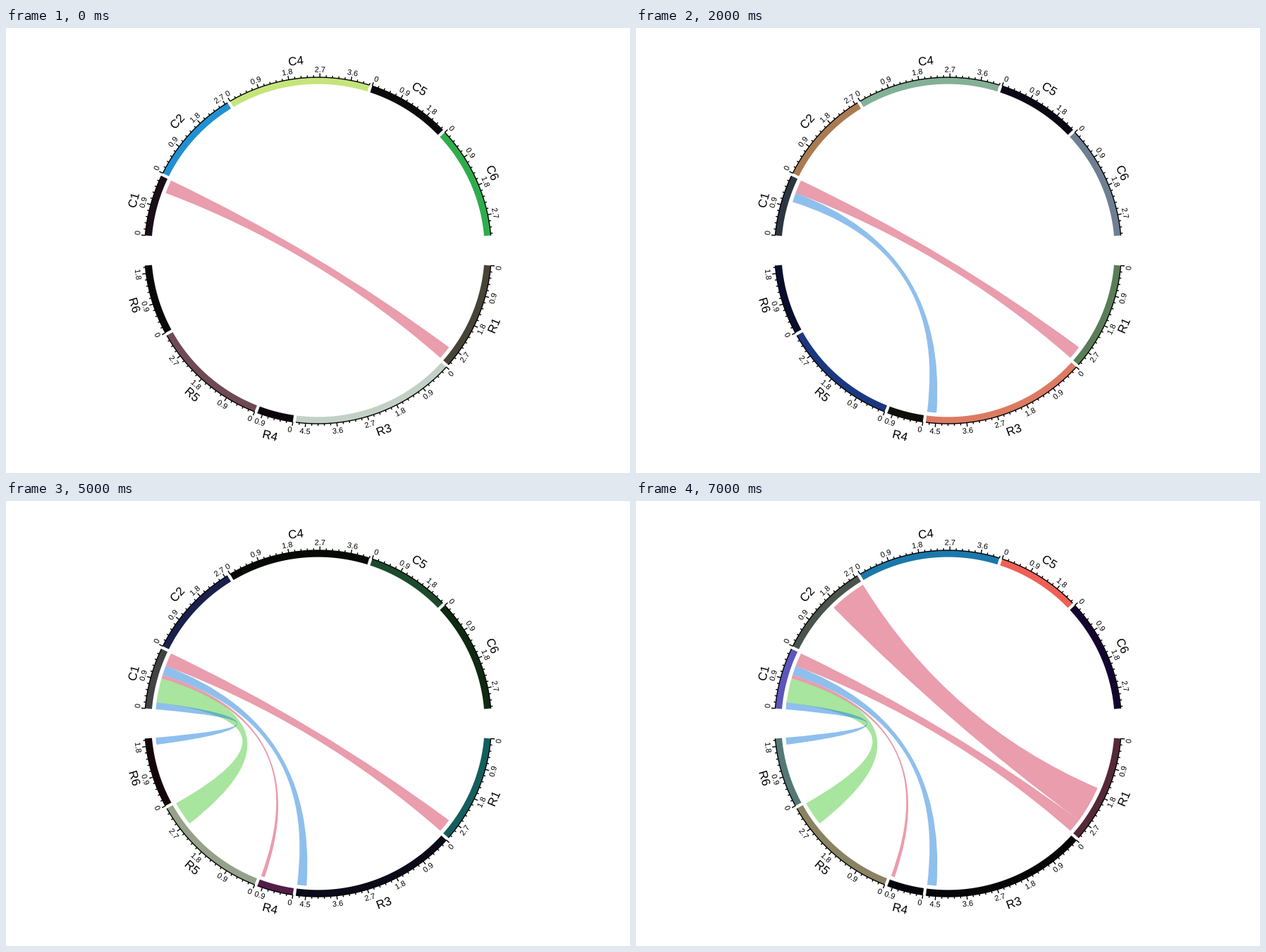
Write a matplotlib script that moves like this. It is 885 px wide and 632 px high and loops after 8000 ms.

```python
import numpy as np
import matplotlib.pyplot as plt
from matplotlib.animation import FuncAnimation
from matplotlib.patches import PathPatch, Polygon
from matplotlib.path import Path
from matplotlib.textpath import TextPath
from matplotlib.transforms import Affine2D

W, H, DPI = 885, 632, 100
CX, CY = W / 2, H / 2
R_OUT, R_IN, R_LINK = 246, 236.4, 231
R_NUM, R_NAME = 257.2, 271.2
NUM_PX, NAME_PX = 11, 17
BIG_GAP, SMALL_GAP = 10, 1
STEP, MINOR = 0.9, 5
LINE_WIDTH = 1.4 * 72 / DPI

TOP = {"C1": 1.78, "C2": 2.78, "C4": 4.14, "C5": 2.41, "C6": 3.3}
BOTTOM = {"R1": 3.15, "R3": 4.78, "R4": 1.05, "R5": 3.4, "R6": 2.03}

PINK, BLUE, GREEN = "#d53c5c", "#2181dd", "#53cd3f"
# column, row, value, colour, first second shown
LINKS = [
    ("C1", "R1", 0.415, PINK, 0),
    ("C1", "R3", 0.29, BLUE, 2),
    ("C1", "R4", 0.115, PINK, 3),
    ("C1", "R5", 0.745, GREEN, 4),
    ("C1", "R6", 0.215, BLUE, 5),
    ("C2", "R1", 1.14, PINK, 6),
]

# sector colours, one row per second, in sector order
PALETTES = [row.split() for row in (
    "1b0d18 2090d2 c5e47b 0a0a0a 2ead4d 484337 c2d0c6 0b040b 6f4a55 080808",
    "1b0d18 5f6f62 4f6a78 3a2f3c 55705c 5c5a50 7a6f72 22181c 4c4a5c 080808",
    "2b3641 a97b52 83b096 0c0715 6e7f92 5a7d58 dc7a62 0e0f08 1a3880 070e2e",
    "6a6470 64503f 4a5a58 2a4a34 5c4c66 6c8a78 7c6e5e 2a1c22 3c4248 5a6470",
    "e8cbe4 5e1a12 12161b 1f8b35 67235f c6ecdc 61755d 2a0c20 3e4213 c6e8e8",
    "424242 1a204c 060a06 1c4a2c 0e2a10 135e5e 0a0a18 521d48 96a18a 150408",
    "987f8a 44a52c 0e060a 809c68 65506d 1a633d 6c6698 987c88 647a3c 333333",
    "5b57bb 48544c 1b78aa ee6055 130530 552838 060608 06030a 8a8262 547875",
)]

plt.rcParams["font.family"] = "Liberation Sans"
fig = plt.figure(figsize=(W / DPI, H / DPI), dpi=DPI, facecolor="white")
ax = fig.add_axes([0, 0, 1, 1])
ax.set_xlim(0, W)
ax.set_ylim(H, 0)
ax.axis("off")


def polar(angle, r):
    """Point at an angle measured clockwise from the left."""
    a = np.radians(angle)
    return np.stack([CX - r * np.cos(a), CY - r * np.sin(a)], axis=-1)


def arc(lo, hi, r):
    return polar(np.linspace(lo, hi, max(3, int(abs(hi - lo) * 2))), r)


def line(points):
    ax.plot(*points.T, color="black", lw=LINE_WIDTH, solid_capstyle="butt")


def label(text, r, size, angle, lo=0, hi=360):
    """Text along the circle, kept between the angles lo and hi."""
    glyphs = TextPath((0, 0), text, size=size)
    box = glyphs.get_extents()
    half = np.degrees(box.width / 2 / r)
    angle = np.clip(angle, lo + half, hi - half)
    turn = angle - (90 if angle < 180 else 270)
    place = (Affine2D()
             .translate(-(box.x0 + box.x1) / 2, -(box.y0 + box.y1) / 2)
             .scale(1, -1).rotate_deg(turn).translate(*polar(angle, r)))
    ax.add_patch(PathPatch(place.transform_path(glyphs), fc="black", lw=0))


def layout(values, start):
    span = 180 - BIG_GAP - SMALL_GAP * (len(values) - 1)
    scale = span / sum(values.values())
    spans = {}
    for name, value in values.items():
        spans[name] = (start, start + value * scale)
        start += value * scale + SMALL_GAP
    return spans, scale


def draw_axis(lo, hi, scale):
    line(arc(lo, hi, R_OUT))
    count = int((hi - lo) / scale / STEP * MINOR + 1e-6)
    for i in range(count + 1):
        angle = lo + i * STEP / MINOR * scale
        major = i % MINOR == 0
        line(polar(angle, np.array([R_OUT, R_OUT + (5.5 if major else 3)])))
        if major:
            text = f"{i // MINOR * STEP:.1f}" if i else "0"
            label(text, R_NUM, NUM_PX, angle, lo, hi)


def ribbon(a, b, color):
    """Band between two arcs, its sides bent towards the centre."""
    first, second = arc(*a, R_LINK), arc(*b, R_LINK)
    centre = [(CX, CY)]
    verts = np.vstack([first, centre, second, centre, first[:1]])
    codes = ([Path.MOVETO] + [Path.LINETO] * (len(first) - 1)
             + [Path.CURVE3] * 2 + [Path.LINETO] * (len(second) - 1)
             + [Path.CURVE3] * 2)
    patch = PathPatch(Path(verts, codes), fc=color, alpha=0.5, lw=0)
    return ax.add_patch(patch)


top, scale = layout(TOP, BIG_GAP / 2)
bottom, _ = layout(BOTTOM, 180 + BIG_GAP / 2)
spans = {**top, **bottom}

sectors = []
for name, (lo, hi) in spans.items():
    ring = np.vstack([arc(lo, hi, R_OUT), arc(hi, lo, R_IN)])
    sectors.append(ax.add_patch(Polygon(ring, closed=True, lw=0)))
    draw_axis(lo, hi, scale)
    label(name, R_NAME, NAME_PX, (lo + hi) / 2)

# each link takes the last free part of both its sectors
free = {name: hi for name, (_, hi) in spans.items()}


def take(name, value):
    hi = free[name]
    free[name] = hi - value * scale
    return free[name], hi


ribbons = [(ribbon(take(col, value), take(row, value), color), since)
           for col, row, value, color, since in LINKS]


def update(second):
    for sector, color in zip(sectors, PALETTES[second]):
        sector.set_facecolor("#" + color)
    for patch, since in ribbons:
        patch.set_visible(second >= since)
    return sectors + [patch for patch, _ in ribbons]


anim = FuncAnimation(fig, update, frames=len(PALETTES), interval=1000,
                     repeat=True, repeat_delay=0, blit=False)
plt.show()
```
